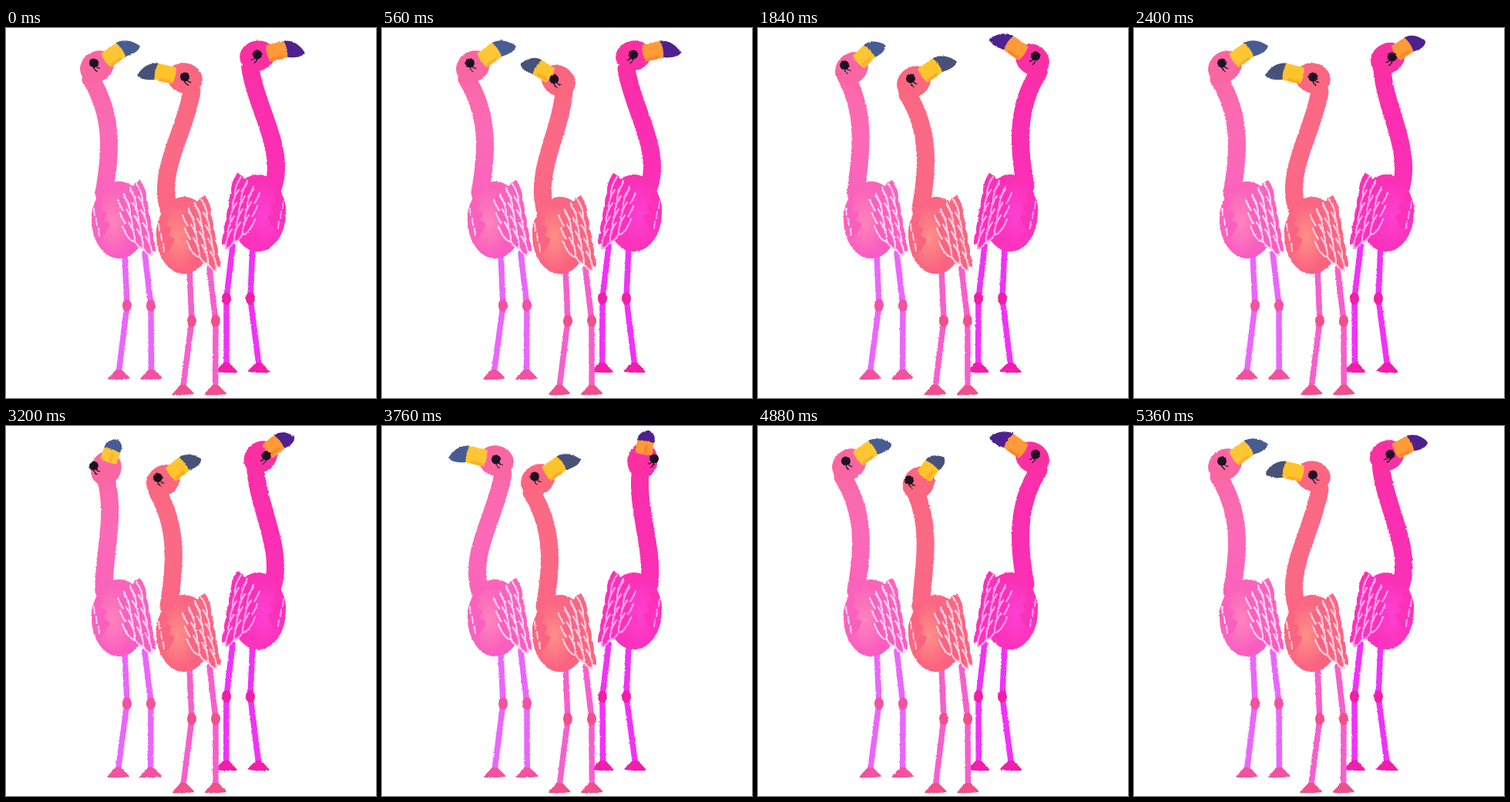
These frames come from a looping animation (480x480 px, 5440 ms). An HTML page:

```html
<!DOCTYPE html>
<html lang="en">
<head>
<meta charset="utf-8">
<title>Flamingos</title>
<style>
  html, body { margin: 0; width: 100%; height: 100%; overflow: hidden; background: #fff; }
  svg { display: block; width: 100vw; height: 100vh; }
  path { stroke-linejoin: round; stroke-linecap: round; }
</style>
</head>
<body>
<svg viewBox="0 0 480 480">
  <filter id="rough" filterUnits="userSpaceOnUse" x="0" y="0" width="480" height="480" color-interpolation-filters="sRGB">
    <feTurbulence id="noise" type="fractalNoise" baseFrequency=".4" numOctaves="2" result="n"/>
    <feDisplacementMap in="SourceGraphic" in2="n" scale="2.5" xChannelSelector="R" yChannelSelector="G"/>
  </filter>
  <g id="flock" filter="url(#rough)"></g>
</svg>
<script>
const LOOP = 5440, STEP = 80;

// One bird drawn three times. Its turn runs from -1 (looks right) over 0 (looks up) to 1 (looks left).
// Each move is [start, duration, turn reached].
const BIRDS = [
  { place: 'matrix(-1 0 0 1 474 -9)',
    skin: ['#fa30a2', '#fa2eb0', '#fb32bc'], glow: '#ff40d2', leg: '#f032f6', joint: '#f01ea8',
    beak: '#ff9a38', shade: '#ff8330', tip: '#4f2090', line: '#ffa0ea',
    first: 1, moves: [[640, 320, -1], [2080, 400, 1], [3040, 400, .2], [3920, 400, -1], [4960, 480, 1]] },
  { place: '',
    skin: ['#fa66a2', '#fb6ab6', '#fa5cc0'], glow: '#ff84bc', leg: '#ea66fb', joint: '#f2529f',
    beak: '#ffc634', shade: '#ffae2e', tip: '#485c94', line: '#ffd0f2',
    first: -1, moves: [[640, 320, 1], [1240, 760, -1], [2960, 560, 1], [4400, 320, -1]] },
  { place: 'translate(84 20)',
    skin: ['#fb6680', '#fa6a86', '#fb6280'], glow: '#ff9088', leg: '#f560cc', joint: '#f0508c',
    beak: '#ffc42c', shade: '#ffa92a', tip: '#485278', line: '#ffd0e0',
    first: 1, moves: [[480, 400, -1], [1960, 440, 1], [2720, 560, -1], [4760, 400, 1]] }
];

function turnAt({ first, moves }, t) {
  return moves.reduce((u, [start, span, to]) => {
    const k = Math.min(1, Math.max(0, (t - start) / span));
    return u + (to - u) * k * k * (3 - 2 * k);
  }, first);
}

function leg(b, hip, knee, foot) {
  return `<path d="M${hip} 292L${knee} 360L${foot} 446" fill="none" stroke="${b.leg}" stroke-width="7.5"/>
    <ellipse cx="${knee}" cy="360" rx="6" ry="8" fill="${b.joint}"/>
    <path d="M${foot - 13} 455L${foot - 3} 444h6L${foot + 13} 454Q${foot} 456 ${foot - 13} 455Z"
      fill="${b.joint}" stroke="${b.joint}" stroke-width="2"/>`;
}

// A feather hanging down to its tip at x, y; side is 1 for the right wing, -1 for the left.
function feather(x, y, side, fill, line) {
  return `<path d="M${x - 16 * side} ${y - 20}Q${x - 8 * side} ${y} ${x} ${y}Q${x + side} ${y - 12} ${x - 8 * side} ${y - 25}"
    fill="${fill}" stroke="${line}" stroke-width="2.2"/>`;
}

function wings(fill, line) {
  let out = '';
  for (let j = 0; j < 3; j++) out += feather(111 + 4 * j, 246 + 14 * j, -1, fill, 'none');
  for (const row of [0, .5, 1.3, 2.1])
    for (let j = 0; j < 5 - row; j++)
      out += feather(182 + 3 * j - 10 * row, 222 + 17 * j + 10 * row, 1, fill, row ? line : 'none');
  for (let j = 0; j < 3; j++) out += `<path d="M${114 + 3 * j} ${234 + 13 * j}l1 9" stroke="${line}" stroke-width="2"/>`;
  return out;
}

function head(b, u, fill) {
  const x = 133 + 15 * u, y = 55 - 2.5 * u - 7.5 * u * u;
  const angle = -85 - 66 * u - 16 * u * u;
  const reach = .65 + .35 * u * u; // the beak looks shorter when it points up
  const ex = x - 16 + 2 * u + 14 * u * u, ey = y - 3 + 1.5 * u;
  return `<g transform="translate(${x} ${y}) rotate(${angle})">
      <ellipse rx="23" ry="19.5" fill="${fill}"/>
      <g transform="scale(${reach} 1)">
        <path d="M15 -10L39 -10V10L15 10Q12 0 15 -10Z" fill="${b.beak}" stroke="${b.beak}" stroke-width="2"/>
        <path d="M17 ${-9 * u}L30 ${-9 * u}" stroke="${b.shade}" stroke-width="4"/>
        <path d="M39 -10Q54 ${-11 - 4 * u} 60 ${-10 * u}Q54 ${11 - 4 * u} 39 10Q42 0 39 -10Z" fill="${b.tip}" stroke="${b.tip}" stroke-width="2"/>
      </g>
    </g>
    <circle cx="${ex}" cy="${ey}" r="6" fill="#1d1122"/>
    <path d="M${ex + 3} ${ey + 4}q2 3 5 3m-8 -1q1 3 4 5" fill="none" stroke="#1d1122" stroke-width="1.2"/>`;
}

function draw(b, i, t) {
  const u = turnAt(b, t), skin = `url(#skin${i})`;
  const sway = Math.sin(t / LOOP * Math.PI * 8 + i * 2);
  return `<g transform="${b.place}">
    <linearGradient id="skin${i}" gradientUnits="userSpaceOnUse" x1="0" y1="30" x2="0" y2="290">
      <stop stop-color="${b.skin[0]}"/><stop offset=".4" stop-color="${b.skin[1]}"/><stop offset="1" stop-color="${b.skin[2]}"/>
    </linearGradient>
    <radialGradient id="glow${i}">
      <stop stop-color="${b.glow}"/><stop offset="1" stop-color="${b.glow}" stop-opacity="0"/>
    </radialGradient>
    ${leg(b, 154, 157, 146 + sway / 2)}${leg(b, 180, 188, 188 + sway / 2)}
    <ellipse cx="147" cy="249" rx="36" ry="50" fill="${skin}"/>
    <path d="M127 214C${124 - 12 * u} 165 ${144.5 + 4.5 * u} 114 ${133.5 + 23.5 * u} ${64 - 2 * u}"
      fill="none" stroke="${skin}" stroke-width="23"/>
    <ellipse cx="139" cy="252" rx="28" ry="44" fill="url(#glow${i})"/>
    ${wings(skin, b.line)}
    ${head(b, u, skin)}
  </g>`;
}

const flock = document.getElementById('flock');
const noise = document.getElementById('noise');
let last = -1;

function frame(now) {
  const step = Math.floor(now % LOOP / STEP);
  if (step !== last) {
    last = step;
    noise.setAttribute('seed', step);
    flock.innerHTML = BIRDS.map((b, i) => draw(b, i, step * STEP)).join('');
  }
  requestAnimationFrame(frame);
}
frame(0);
</script>
</body>
</html>
```
